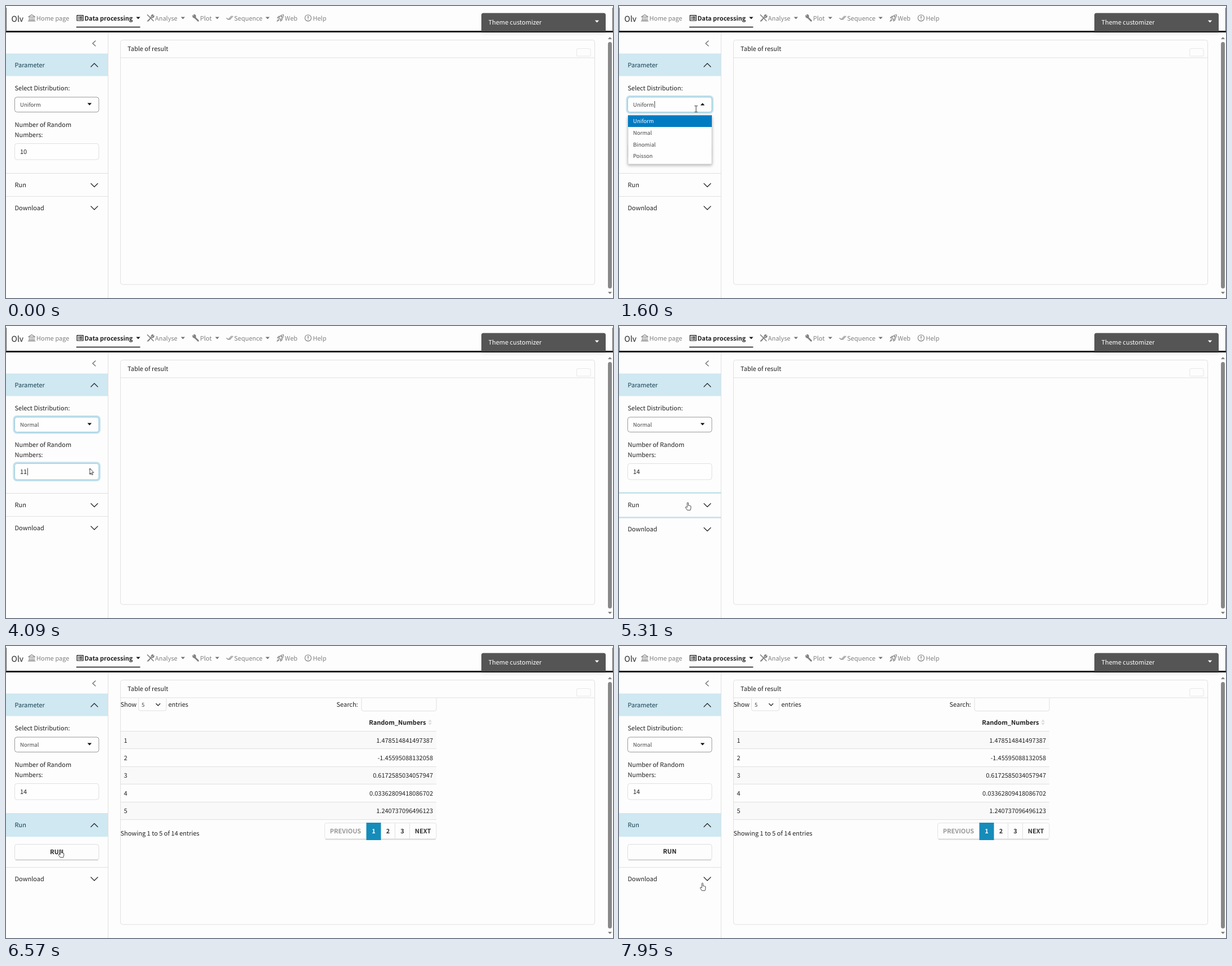
An HTML page for the animation above (7990 ms loop, 1079 px wide and 519 px high).

```html
<!DOCTYPE html>
<html lang="en">
<head>
<meta charset="utf-8">
<title>Random numbers</title>
<style>
  html, body { margin: 0; width: 100%; height: 100%; overflow: hidden; background: #fdfdfd; }
  svg { display: block; width: 100%; height: 100%; }
  text { font: 11px "Noto Sans CJK SC", "Noto Sans CJK JP", "Noto Sans CJK", "Noto Sans", sans-serif; fill: #222; text-rendering: geometricPrecision; white-space: pre; }
  .small { font-size: 9.6px; fill: #444; }
  .bold { font-weight: 700; }
  .nav { fill: #808080; }
  .head { fill: #173f4d; }
  .line { fill: none; stroke: #e0e0e0; }
  .chev { fill: none; stroke: #222; stroke-width: 1.2; stroke-linecap: round; stroke-linejoin: round; }
  .icon { fill: none; stroke: #808080; stroke-width: 1.1; stroke-linecap: round; stroke-linejoin: round; }
  .ring { fill: none; stroke: #c2e1ed; stroke-width: 3; }
  .mid { text-anchor: middle; }
  .end { text-anchor: end; }
</style>
</head>
<body>
<svg viewBox="0 0 1079 519" preserveAspectRatio="none">
  <defs>
    <path id="down" class="chev" d="M-6-3L0 3 6-3"/>
    <path id="tri" d="M-3.7-1.9H3.7L0 1.9Z"/>
    <clipPath id="fold"><rect id="foldBox" y="339" width="181" height="0"/></clipPath>
    <filter id="soft" x="-20%" y="-30%" width="140%" height="170%"><feGaussianBlur stdDeviation="2.5"/></filter>
  </defs>

  <rect width="1079" height="519" fill="#fdfdfd"/>
  <rect x="845" y="40" width="221" height="9" rx="3" fill="#000" opacity=".12" filter="url(#soft)"/>
  <rect y="44" width="1079" height="3" fill="#1c191c"/>
  <path d="M.5 3V45M1078.5 3V45" stroke="#555" fill="none"/>
  <g id="nav">
    <text x="9.5" y="27.5" style="font-size:14px">Olv</text>
    <g class="icon">
      <path d="M39.8 19.2L45.7 15.5 51.6 19.2ZM41.5 20.5V25M44.3 20.5V25M47.1 20.5V25M49.9 20.5V25M40.5 25.3H51M39.5 27H52"/>
      <path d="M126.2 16.6H137.2V26H126.2ZM128.4 19.3H129M130.8 19.3H135.2M128.4 21.4H129M130.8 21.4H135.2M128.4 23.6H129M130.8 23.6H135.2" stroke="#111" stroke-width="1.2"/>
      <path d="M251.5 15.7L262 26.5M251.7 26.7L258.5 19.7M258.5 19.7Q257.7 15.7 261.3 15.5L260.2 17.4 261.2 18.6 263 17.5Q263 20.8 259.5 20.6M252.6 26.8L255.2 24.2" stroke-width="1.6"/>
      <path d="M341.6 26.2L335.6 20.3" stroke-width="2.8"/>
      <path d="M332 16.6L334 18.4 335.2 17.4 333.7 15.4Q337.5 15.3 337.2 19L335 21.3Q331.4 20.8 332 16.6Z" fill="#808080"/>
      <path d="M392.3 21.5L395 24.2 401 17.8M397 23.6L397.7 24.2 403.3 18.2"/>
      <path d="M485.3 21.3Q487.5 15.6 493.5 15.5 493.5 21.2 487.9 23.8ZM485.5 20.8L482.2 21.3 484.6 18.4 487 18.3M488.2 23.6L488 27 490.9 24.5 490.9 22M484.6 23L481.8 27.2 486 24.6"/>
      <circle cx="490" cy="19" r=".9"/>
      <circle cx="537" cy="21.3" r="5.6"/>
      <path d="M537 18V21.8M537 24.2V24.3" stroke-width="1.4"/>
    </g>
    <path d="M125 37.5H238.5" stroke="#111" stroke-width="1.3"/>
  </g>
  <path d="M845 45V16Q845 12.5 848.5 12.5H1062.500Q1066 12.500 1066 16V45Z" fill="#555"/>
  <text x="857.5" y="32.500" style="fill:#fff">Theme customizer</text>
  <use href="#tri" x="1050.500" y="27.500" fill="#fff"/>

  <path class="line" d="M181.500 47V519"/>
  <path class="chev" d="M159 62L154 66.500 159 71" style="stroke:#666"/>
  <rect y="84.500" width="181" height="40" fill="#cfe8f2"/>
  <text x="15.500" y="109" class="head">Parameter</text>
  <use href="#down" transform="translate(157 105) scale(1 -1)"/>
  <text x="15.500" y="150">Select Distribution:</text>
  <rect id="selRing" class="ring" x="14" y="160.500" width="152.500" height="29.500" rx="5"/>
  <rect id="selBox" x="15.500" y="162" width="149.500" height="26.500" rx="4" fill="#fefefe" stroke="#999"/>
  <text id="selText" class="small" x="25" y="178.500"></text>
  <path id="selCaret" d="M63.500 169V181" stroke="#333" stroke-width=".9"/>
  <use id="selTri" href="#tri"/>
  <text x="15.500" y="214.500">Number of Random</text>
  <text x="15.500" y="233">Numbers:</text>
  <rect id="numRing" class="ring" x="14" y="243" width="152.500" height="31.500" rx="5"/>
  <rect id="numBox" x="15.500" y="244.500" width="149.500" height="28.500" rx="4" fill="#fefefe" stroke="#e0e0e0"/>
  <text id="num" x="25" y="263"></text>
  <path id="numCaret" d="M38.500 252.500V265.500" stroke="#333" stroke-width=".9"/>
  <path id="spin" d="M147.200 255.700L149.800 253 152.400 255.700ZM147.200 261.800L149.800 264.500 152.400 261.800Z" fill="#777"/>

  <rect id="runHead" y="298" width="181" height="41" fill="#cfe8f2"/>
  <path class="line" d="M0 297.500H181"/>
  <text id="runText" x="15.500" y="322">Run</text>
  <use id="runChev" href="#down"/>
  <g clip-path="url(#fold)">
    <rect x="15.500" y="352.500" width="149.500" height="28" rx="4" fill="#fdfdfd" stroke="#dedede"/>
    <path d="M17 380.300H163.500" stroke="#d0d0d2" stroke-width="2"/>
    <text id="runBtn" class="bold mid" x="90.300">RUN</text>
  </g>
  <g id="download">
    <path class="line" d="M0 338.500H181"/>
    <text x="15.500" y="363">Download</text>
    <use href="#down" x="157" y="359"/>
  </g>
  <path id="runRing" d="M0 296.500H181M0 340.200H181" stroke="#c6e3ec" stroke-width="2.600"/>

  <rect class="line" x="203.500" y="60.500" width="843" height="434.500" rx="4"/>
  <path class="line" d="M204 92H1046"/>
  <path class="line" d="M1014.500 89V78Q1014.500 75.500 1017 75.500H1036.500Q1039 75.500 1039 78V89Z" style="stroke:#e8e8e8"/>
  <text x="216" y="80">Table of result</text>
  <rect x="1070" y="64" width="7" height="438" rx="3.500" fill="#888"/>
  <path d="M1070 59L1073.500 55 1077 59ZM1070 508L1073.500 512 1077 508Z" fill="#808080"/>

  <g id="table">
    <text x="203.500" y="107.500">Show</text>
    <path class="line" d="M235.500 93V111.500Q235.500 115 239 115H281.500Q285 115 285 111.500V93"/>
    <text x="241" y="107.500" class="small">5</text>
    <path class="chev" d="M266.800 102.500L270.300 106 273.800 102.500"/>
    <text x="288.500" y="107.500">entries</text>
    <text x="587.500" y="107.500">Search:</text>
    <path class="line" d="M632 93V112Q632 115.500 635.500 115.500H761.500Q765 115.500 765 112V93"/>
    <text class="bold end" x="746.500" y="139.500">Random_Numbers</text>
    <path d="M750.500 134.800L753.700 130.500 757 134.800ZM750.500 136.500L753.700 140.800 757 136.500Z" fill="#ddd"/>
    <g id="rows"></g>
    <text x="203.500" y="337">Showing 1 to 5 of 14 entries</text>
    <rect x="566.500" y="314.500" width="198.500" height="29" rx="4" fill="#fdfdfd" stroke="#e4e4e4"/>
    <path d="M568 343.500H763.500" stroke="#d5d6d8" stroke-width="2"/>
    <path class="line" d="M691.500 315V343M717.500 315V343"/>
    <rect x="640.500" y="314" width="26" height="31" fill="#158cba"/>
    <g id="pages"></g>
  </g>

  <g id="menu">
    <rect x="15" y="197" width="151" height="87" rx="3" opacity=".25" filter="url(#soft)"/>
    <rect x="16" y="194" width="149" height="87" fill="#fefefe" stroke="#ccc" stroke-width=".8"/>
    <rect id="pick" x="16" width="149" height="20.700" fill="#007bc2"/>
    <g id="items"></g>
  </g>
  <path id="cursor"/>
</svg>
<script>
const $ = id => document.getElementById(id);
const LOOP = 7990;

function text(parent, x, y, str, cls = '') {
  const el = document.createElementNS('http://www.w3.org/2000/svg', 'text');
  el.setAttribute('x', x);
  el.setAttribute('y', y);
  el.setAttribute('class', cls);
  el.textContent = str;
  parent.append(el);
  return el;
}

function set(id, attrs) {
  for (const k in attrs) $(id).setAttribute(k, attrs[k]);
}

const show = (id, on) => set(id, { opacity: +on });
const clamp = v => Math.min(1, Math.max(0, v));
const ramp = (t, start, len) => clamp((t - start) / len);
const smooth = p => p * p * (3 - 2 * p);

// Navigation entries: label, x, x of the small triangle
[['Home page', 54], ['Data processing', 139.500, 235], ['Analyse', 265, 314.500], ['Plot', 345, 375.500],
 ['Sequence', 405.500, 465], ['Web', 495.500], ['Help', 545.500]].forEach(([label, x, tri], i) => {
  text($('nav'), x, 25.500, label, i === 1 ? 'bold' : 'nav');
  if (tri) $('nav').insertAdjacentHTML('beforeend',
    `<use href="#tri" x="${tri}" y="21.300" fill="${i === 1 ? '#111' : '#707070'}"/>`);
});

// Table rows
['1.478514841497387', '-1.45595088132058', '0.6172585034057947', '0.03362809418086702', '1.240737096496123']
  .forEach((value, i) => {
    const y = 151.500 + 31.400 * i;
    $('rows').insertAdjacentHTML('beforeend',
      `<rect x="204" y="${y}" width="561" height="31.400" fill="${i % 2 ? '#fdfdfd' : '#f9f9f9'}"/>
       <path class="line" d="M204 ${Math.floor(y) + .5}H765"/>`);
    text($('rows'), 209.500, y + 20, i + 1);
    text($('rows'), 759, y + 20, value, 'end');
  });
$('rows').insertAdjacentHTML('beforeend', '<path class="line" d="M204 308.500H765"/>');

[['PREVIOUS', 603.500, '#999'], ['1', 653.500, '#fff'], ['2', 679, '#333'], ['3', 704.500, '#333'], ['NEXT', 741, '#333']]
  .forEach(([label, x, fill]) => { text($('pages'), x, 332.500, label, 'bold mid').style.fill = fill; });

const options = ['Uniform', 'Normal', 'Binomial', 'Poisson']
  .map((name, i) => text($('items'), 25, 208.200 + 20.700 * i, name, 'small'));

// Pointer stops: time, x, y
const stops = [
  [180, 1034, 478], [510, 144, 258], [690, 144, 258], [900, 120, 236], [1150, 124, 206], [1350, 137, 188],
  [1500, 137, 188], [1600, 137, 183], [2020, 120, 228], [2300, 120, 228], [2650, 122, 250], [3050, 116, 266],
  [3400, 110, 262], [3860, 151.500, 259], [4890, 151.500, 259], [5230, 123, 320.500], [5400, 123, 320.500],
  [5640, 112, 362], [5920, 98, 369], [6650, 98, 369], [7320, 150, 428], [7360, 150, 428],
  [7600, 157, 432], [7950, 149, 428]
];

function pointer(t) {
  const i = stops.findIndex(s => s[0] > t);
  if (i < 0) return stops[stops.length - 1].slice(1);
  if (i === 0) return stops[0].slice(1);
  const [a, ax, ay] = stops[i - 1], [b, bx, by] = stops[i];
  const p = smooth((t - a) / (b - a));
  return [ax + (bx - ax) * p, ay + (by - ay) * p];
}

const shapes = {
  arrow: 'M-2.500-6V4.200L-.2 2.200 1.400 5.800 3 5 1.400 1.600H4.500Z',
  hand: 'M-1.800 1.800V-5.600a1.100 1.100 0 0 1 2.200 0V-1.200q1-.8 1.600.1 1-.6 1.500.3 1.200-.3 1.300.8V3.200L3.800 6.800H-1.600L-4.600 2.400q-.4-1.600 1-1.400Z',
  beam: 'M-2.700-5.500H-.7L0-5 .7-5.500H2.700M0-5V5M-2.700 5.500H-.7L0 5 .7 5.500H2.700'
};

function shapeAt(x, y, open) {
  if (x > 181) return 'arrow';
  if (open && y > 194 || y > 298) return 'hand';
  const inSelect = y > 161 && y < 190, inNumber = y > 244 && y < 273 && x < 146;
  return inSelect || inNumber ? 'beam' : 'arrow';
}

function draw(t) {
  const [x, y] = pointer(t);
  const open = t >= 1500 && t < 2300;

  const glow = t < 1500 ? 0 : 1 - ramp(t, 4100, 150);
  show('selRing', 0);
  set('selRing', { opacity: glow });
  set('selBox', { stroke: glow > .5 ? '#8ec7de' : '#999' });
  $('selText').textContent = t < 2300 ? 'Uniform' : 'Normal';
  show('selCaret', open && t < 2020);
  set('selTri', { transform: `translate(148.500 174.500) scale(1 ${open ? -1 : 1})` });
  show('menu', open);
  const chosen = open && y > 215 ? 1 : 0;
  set('pick', { y: 194.300 + 20.700 * chosen });
  options.forEach((el, i) => { el.style.fill = i === chosen ? '#fff' : '#444'; });

  const typing = t >= 4090 && t < 5150;
  const count = t < 4090 ? 10 : 11 + [4330, 4560, 4800].filter(s => t >= s).length;
  const hover = t >= 400 && x < 165 && y > 244 && y < 273 && !open;
  show('numRing', typing);
  set('numBox', { stroke: typing ? '#9accdf' : '#e0e0e0' });
  $('num').textContent = count;
  show('numCaret', typing);
  show('spin', hover || typing);

  const grow = 55 * smooth(ramp(t, 5260, 400));
  const turn = smooth(ramp(t, 5305, 180));
  const focus = t >= 5150 && t < 6300;
  set('foldBox', { height: grow });
  set('download', { transform: `translate(0 ${grow})` });
  set('runHead', { opacity: turn });
  set('runChev', { transform: `translate(157 318.500) scale(1 ${1 - 2 * turn})` });
  $('runText').style.fill = turn > .5 ? '#173f4d' : '#222';
  show('runRing', focus);
  set('runBtn', { y: t >= 6250 && t < 6700 ? 369.800 : 368.800 });
  show('table', t >= 6530);

  const shape = shapeAt(x, y, open);
  set('cursor', {
    d: shapes[shape],
    transform: `translate(${x} ${y})`,
    fill: shape === 'beam' ? 'none' : '#fff',
    stroke: '#333',
    'stroke-width': shape === 'beam' ? 1 : .9,
    'stroke-linejoin': 'round',
    opacity: t >= 180 ? 1 : 0
  });
}

const start = performance.now();
function tick() {
  draw((performance.now() - start) % LOOP);
  requestAnimationFrame(tick);
}
tick();
</script>
</body>
</html>
```
